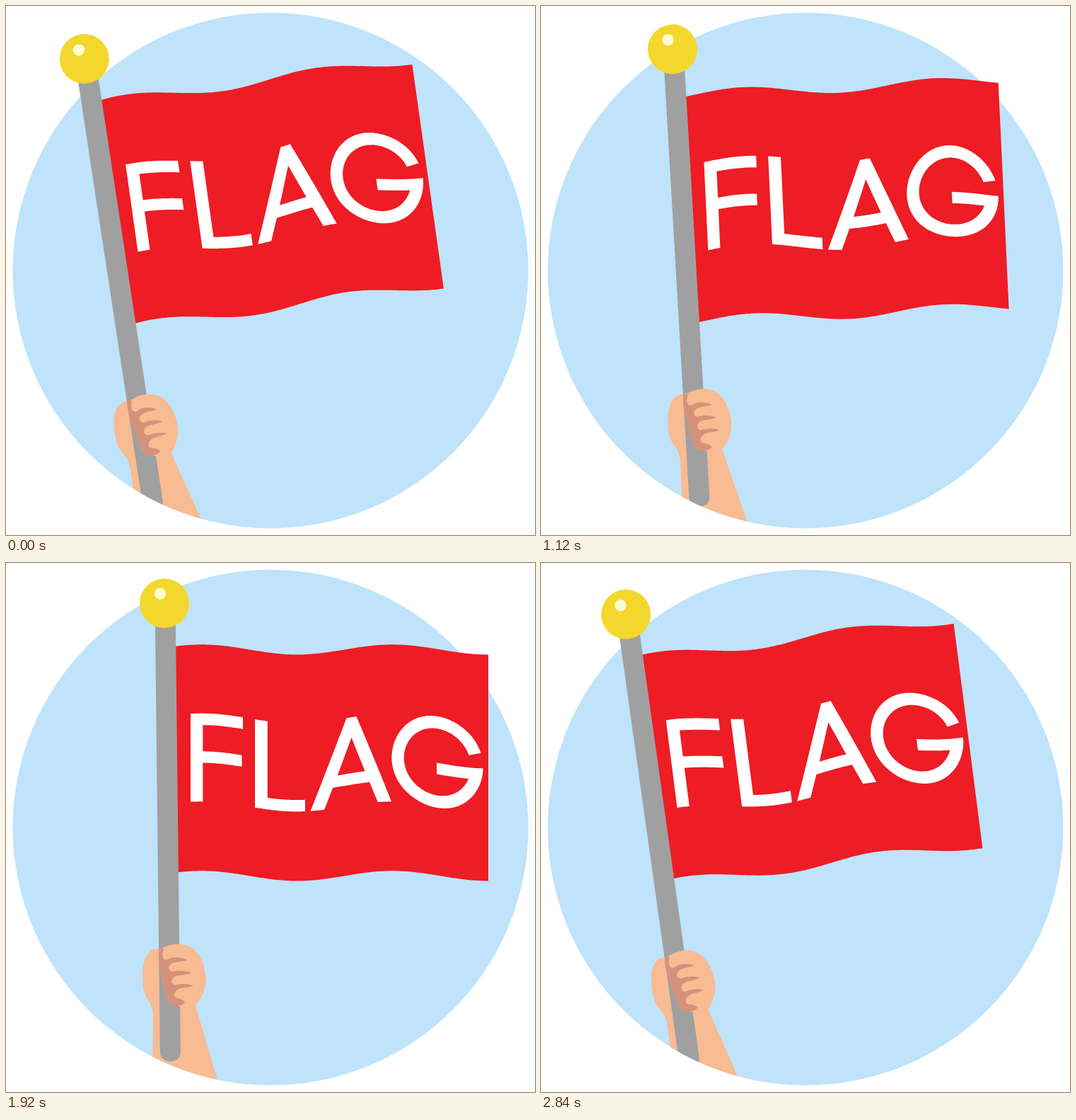
Recreate the animation shown at these times as an HTML page with a canvas. Size 748 px wide and 748 px high, loop 2880 ms.

```html
<!DOCTYPE html>
<html lang="en">
<head>
<meta charset="utf-8">
<title>Waving flag</title>
<style>
html, body { margin: 0; width: 100%; height: 100%; overflow: hidden; background: #fff; }
canvas { display: block; width: 100vw; height: 100vh; }
</style>
</head>
<body>
<canvas id="stage" width="748" height="748" role="img" aria-label="A hand waving a red flag that reads FLAG"></canvas>
<script>
const ctx = document.getElementById('stage').getContext('2d');
const TAU = Math.PI * 2, DEG = Math.PI / 180;
const STEP = 40, FRAMES = 72;
const PIVOT = { x: 293.6, y: 875.5 };
const SKY = '#bfe3fb', RED = '#ee1c25', POLE = '#a0a0a0', SKIN = '#f8bb92',
      SHADE = '#d6917a', GOLD = '#f4d72d', SHINE = '#fffbd2';

// Letter outlines: x on the stage, y measured down from the flag's top edge.
const TOP = 97.3, BASE = 222;
const F = [[261, TOP], [335, TOP], [335, 113.8], [278.3, 113.8], [278.3, 151], [333.5, 151],
           [333.5, 167.3], [278.3, 167.3], [278.3, BASE], [261, BASE]];
const L = [[352, TOP], [369.8, TOP], [369.8, 205.6], [423, 205.6], [423, BASE], [352, BASE]];
const A = [[481.5, TOP], [495.5, TOP], [545, BASE], [525.8, BASE], [514, 192.6],
           [462.2, 192.6], [450, BASE], [430.5, BASE]];
const A_HOLE = [[488.4, 126], [507.6, 176.3], [468.8, 176.3]];

function arc(cx, cy, r, from, to) {
  const pts = [];
  for (let i = 0; i <= 60; i++) {
    const a = (from + (to - from) * i / 60) * DEG;
    pts.push([cx + r * Math.cos(a), cy + r * Math.sin(a)]);
  }
  return pts;
}
const G = [
  ...arc(610, 159.7, 64.7, -18.2, -358.8),
  [609, 161], [609, 177],
  ...arc(610, 159.7, 47.3, 21.4, -340 + 320),
].slice(0, 63).concat(arc(610, 159.7, 47.3, -338.6, -20));

function fill(path, color, rule) {
  ctx.fillStyle = color;
  ctx.fill(path, rule || 'nonzero');
}

function disc(x, y, r, color) {
  const p = new Path2D();
  p.arc(x, y, r, 0, TAU);
  fill(p, color);
}

// Bends a closed outline with the cloth, splitting long sides into short ones.
function warp(path, pts, wave) {
  pts.forEach(([x0, y0], i) => {
    const [x1, y1] = pts[(i + 1) % pts.length];
    const n = Math.max(1, Math.ceil(Math.abs(x1 - x0) / 3));
    for (let k = 0; k < n; k++) {
      const x = x0 + (x1 - x0) * k / n;
      const y = y0 + (y1 - y0) * k / n + wave(x);
      if (i || k) path.lineTo(x, y); else path.moveTo(x, y);
    }
  });
  path.closePath();
}

const arm = new Path2D('M218 545C206 544 197 552 194 570C192 590 192 603 199 615' +
  'C206 624 208 632 208 645L207 760L307 760L299 731L268 626L240 560Z');
const pole = new Path2D('M210.8 80L239.8 80L246.8 691C246.8 700 241 704.6 232.5 704.6' +
  'C224 704.6 217.9 700 217.8 691Z');
const fist = new Path2D('M217 546C224 543 236 538 245 539C262 539 274 551 279 568' +
  'C284 585 284 600 276 614C272 621 270 623 268 626L246 627L232 623' +
  'C226 615 224 600 221 585C217 570 214 555 217 546Z');
const grip = new Path2D('M217 546Q222 543 223 546C219 556 222 562 228 561C233 558 237 557 241 558' +
  'C248 558 255 560 256 562C250 564 240 563 235 566C228 570 229 577 236 578' +
  'C245 575 256 577 262 580C254 583 246 582 240 584C233 587 232 595 239 597' +
  'C248 594 260 595 265 598C256 601 248 600 243 603C237 607 236 613 241 615' +
  'C246 616 252 618 253 622C248 627 238 627 232 623C226 615 224 600 221 585' +
  'C217 570 214 555 217 546Z');

// Only the lower half of the disc trims the arm.
const frame = new Path2D();
frame.rect(0, 0, 748, 374);
frame.arc(374, 374, 364.5, 0, Math.PI);

function draw(n) {
  const swing = 4 - 12 * Math.abs(1 - (n % 36) / 18);
  const wave = x => 122.4 - 7.1 * Math.cos(TAU * ((x - 276.5) / 270 - n / 24));

  ctx.clearRect(0, 0, 748, 748);
  disc(374, 374, 364.5, SKY);

  ctx.save();
  ctx.clip(frame);
  ctx.translate(PIVOT.x, PIVOT.y);
  ctx.rotate(swing * DEG);
  ctx.translate(-PIVOT.x, -PIVOT.y);

  const cloth = new Path2D();
  warp(cloth, [[239.5, 0], [682, 0], [682, 320], [243, 320]], wave);
  fill(cloth, RED);

  const word = new Path2D();
  for (const shape of [F, L, A, A_HOLE, G]) warp(word, shape, wave);
  fill(word, '#fff', 'evenodd');

  fill(arm, SKIN);
  fill(pole, POLE);
  fill(fist, SKIN);
  fill(grip, SHADE);
  disc(224, 57, 35, GOLD);
  disc(218, 43.5, 8.2, SHINE);
  ctx.restore();
}

const start = performance.now();
function tick() {
  draw(Math.floor((performance.now() - start) / STEP) % FRAMES);
  requestAnimationFrame(tick);
}
tick();
</script>
</body>
</html>
```
